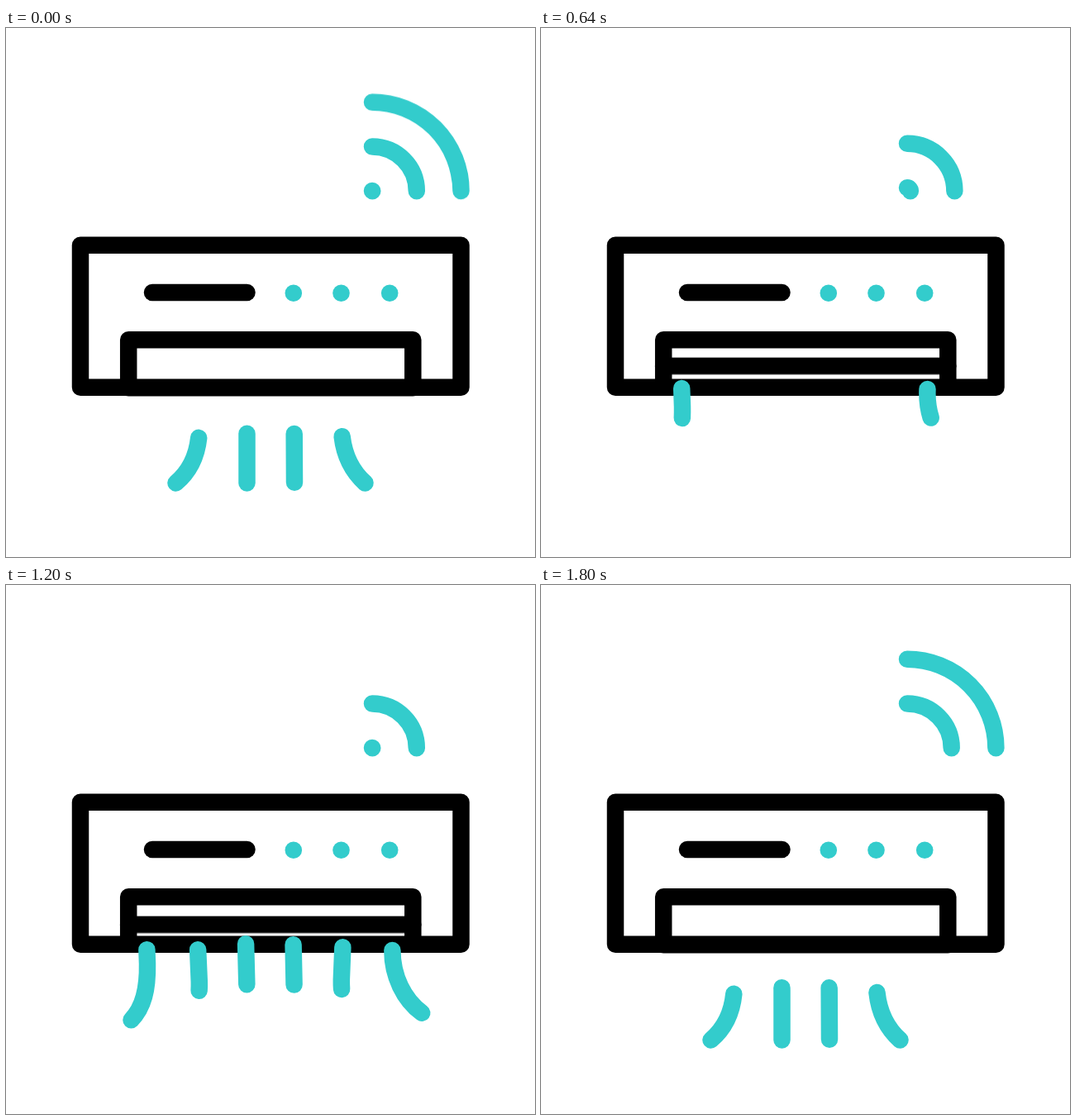
Write an HTML page that moves like this. It is 640x640 px and loops after 1.82 s.

```html
<!DOCTYPE html>
<html lang="en">
<head>
<meta charset="utf-8">
<title>Smart air conditioner</title>
<style>
  @property --from { syntax: "<length>"; inherits: false; initial-value: 0px; }
  @property --to { syntax: "<length>"; inherits: false; initial-value: 0px; }

  html, body { margin: 0; width: 100%; height: 100%; overflow: hidden; background: #fff; }
  svg { display: block; width: 100%; height: 100%; }

  .unit, .teal {
    fill: none;
    stroke: #000;
    stroke-width: 20.5;
    stroke-linecap: round;
    stroke-linejoin: round;
  }
  .teal { stroke: #3cc; }
  .lights { fill: #3cc; }

  .flap { animation: flap 1820ms ease-in-out infinite; }
  @keyframes flap {
    0% { transform: translateY(0); }
    49.451% { transform: translateY(-31.8px); }
    98.901%, 100% { transform: translateY(0); }
  }

  /* quarter rings: pathLength is 4, one part drawn */
  .ring { stroke-dasharray: 1 9; transform: translate(443px, 197.2px) rotate(-90deg); }
  .near { animation: near 1820ms linear infinite; }
  .far { animation: far 1820ms linear infinite; }
  .last { r: 107.4px; animation: blink 1820ms step-end infinite; }
  @keyframes near {
    0%, 32.967%, 65.934% { r: 0.2px; }
    32.966%, 65.933%, 98.901%, 100% { r: 53.7px; }
  }
  @keyframes far {
    0%, 32.967%, 65.934% { r: 53.7px; }
    32.966%, 65.933%, 98.901%, 100% { r: 107.4px; }
  }
  @keyframes blink {
    0% { opacity: 1; }
    1.098%, 100% { opacity: 0; }
  }

  /* each stream shows the part of its path between --from and --to, in hundredths */
  .stream {
    stroke-dasharray: calc(var(--to) - var(--from)) 999px;
    stroke-dashoffset: calc(0px - var(--from));
  }
  .inner { --first: 50px; animation: inner 1820ms linear infinite; }
  .side { --first: 47.8px; }
  .outer { animation: outer 1820ms linear infinite; }

  @keyframes inner {
    0% { --from: var(--first); --to: 100px; opacity: 1; }
    28% { --from: 100px; --to: 100px; opacity: 1; }
    28.01% { --from: 0px; --to: 0px; opacity: 0; }
    40.38% { --to: 0px; opacity: 0; }
    40.39% { opacity: 1; }
    64.011% { --from: 0px; }
    98.901% { --to: 100px; }
    100% { --from: 48.4px; --to: 100px; opacity: 1; }
  }
  @keyframes outer {
    0% { --from: 0px; --to: 0px; opacity: 0; }
    19.06% { opacity: 0; }
    19.07% { --to: 0px; opacity: 1; }
    35.165% { --to: 30.8px; }
    54.945% { --to: 67.2px; }
    59.341% { --to: 74px; }
    60.44% { --from: 0px; }
    65.934% { --from: 4.3px; --to: 81.2px; }
    72.527% { --from: 16px; }
    79.121% { --from: 30.8px; --to: 94px; }
    90.11% { --from: 67px; --to: 99.3px; }
    98.89% { --from: 100px; --to: 100px; opacity: 1; }
    98.9%, 100% { --from: 100px; --to: 100px; opacity: 0; }
  }
</style>
</head>
<body>
<svg viewBox="0 0 640 640">
  <g class="unit">
    <rect x="90" y="262.8" width="460.5" height="172"/>
    <path d="M177 320H291.5"/>
    <path d="M148.2 434.8V377.2H492.3V434.8"/>
    <path class="flap" d="M148.2 435.2H492.3"/>
  </g>
  <g class="lights">
    <circle cx="347.8" cy="320.7" r="10.3"/>
    <circle cx="405.5" cy="320.7" r="10.3"/>
    <circle cx="464.2" cy="320.7" r="10.3"/>
  </g>
  <g class="teal">
    <circle class="ring near" pathLength="4"/>
    <circle class="ring far" pathLength="4"/>
    <circle class="ring last" pathLength="4"/>

    <path class="stream outer" pathLength="100" d="M170.2 436L171 458C171.8 500 162 525 133.5 538.5"/>
    <path class="stream inner side" pathLength="100" d="M232 438L233.8 480C234.6 510 225 534 205.5 550.5"/>
    <path class="stream inner" pathLength="100" d="M290 431L291.5 490V550.5"/>
    <path class="stream inner" pathLength="100" d="M347.5 432L348.7 490L349 549.8"/>
    <path class="stream inner side" pathLength="100" d="M407.5 435L405.8 478C405.4 508 415 533 434.5 550.5"/>
    <path class="stream outer" pathLength="100" d="M467.5 437C465.5 478 488 516 522 527.5"/>
  </g>
</svg>
</body>
</html>
```
